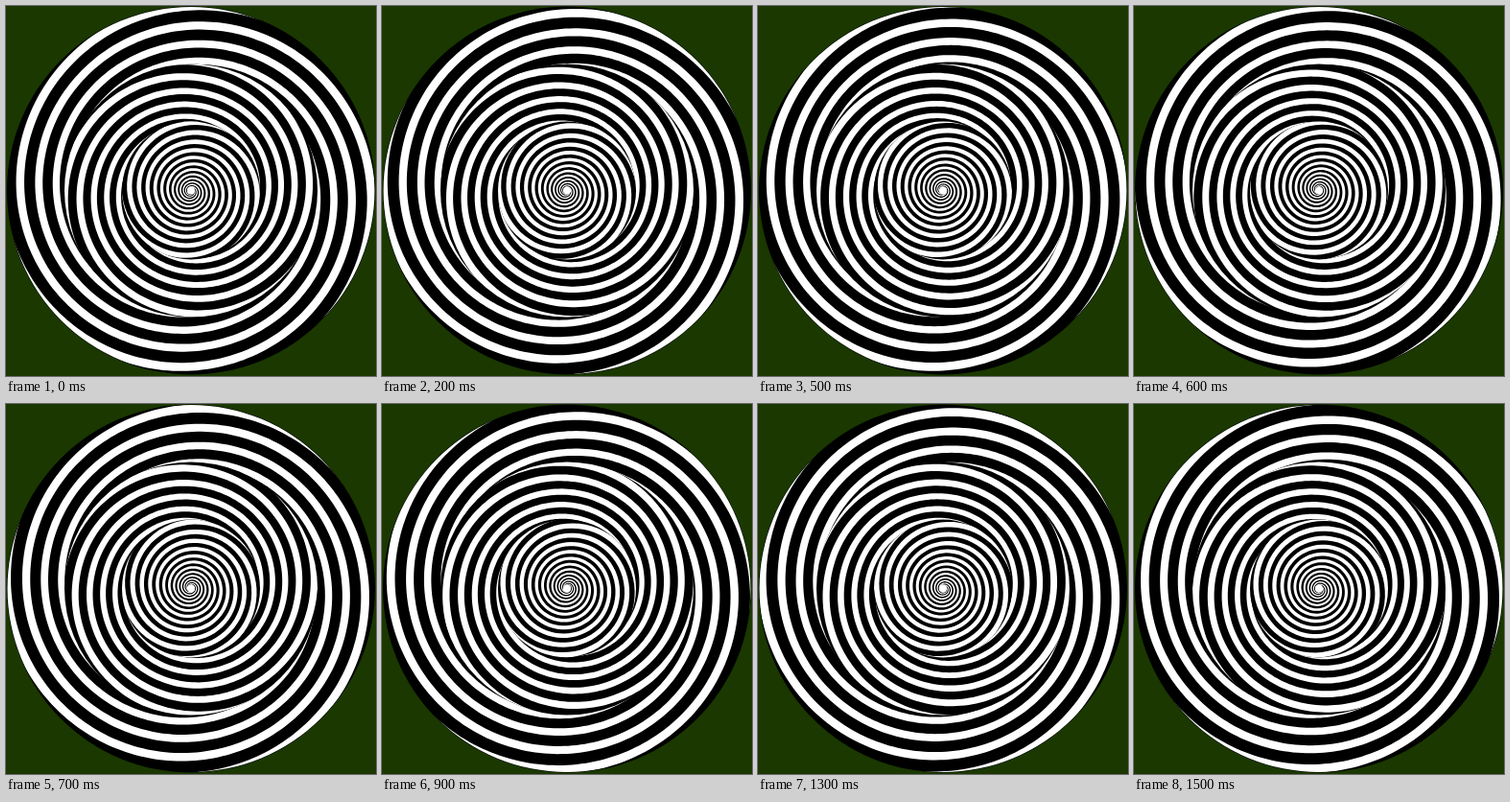
An HTML page with a canvas for the animation above (1600 ms loop, 386 by 386 pixels).

```html
<!DOCTYPE html>
<html lang="en">
<head>
<meta charset="utf-8">
<title>Spiral disc</title>
<style>
  html, body { margin: 0; height: 100%; overflow: hidden; background: #1a3800; }
  canvas { display: block; }
</style>
</head>
<body>
<canvas id="stage" width="386" height="386"></canvas>
<script>
const ctx = document.getElementById('stage').getContext('2d');
const CENTER = { x: 193, y: 192.5 };
const SPIRAL_SHIFT = { x: -0.2, y: 0.9 };
const LOOP = 1600, STEPS = 16;
const ARMS = 3, SECTOR = 2 * Math.PI / ARMS;

// Stripe spacing grows with the radius: u counts stripes from the centre.
const K = 3.78, Q = 0.36;
const stripesAt = r => K * r ** Q;
const radiusAt = u => (Math.max(u, 0) / K) ** (1 / Q);

// tip: angle in degrees at which the inner edge of a white arm meets radius tipAt.
const rings = [
  { from: 132, to: 191.5, dir: 1, tipAt: 191.5, tip: 75, white: 0.42 },
  { from: 72, to: 132, dir: -1, tipAt: 132, tip: 90, white: 0.45 },
  { from: 0, to: 72, dir: 1, tipAt: 72, tip: 60, white: 0.5 }
];

function disc(r, color) {
  ctx.beginPath();
  ctx.arc(0, 0, r, 0, 2 * Math.PI);
  ctx.fillStyle = color;
  ctx.fill();
}

function edge(ring, offset, reverse) {
  const lo = Math.max(stripesAt(ring.from) - 1, 0), hi = stripesAt(ring.to) + 1;
  const count = 400;
  for (let i = 0; i <= count; i++) {
    const f = i / count;
    const u = reverse ? hi + (lo - hi) * f : lo + (hi - lo) * f;
    const a = ring.dir * SECTOR * (offset - u), r = radiusAt(u);
    ctx.lineTo(r * Math.cos(a), -r * Math.sin(a));
  }
}

function drawRing(ring) {
  const start = stripesAt(ring.tipAt) + ring.dir * ring.tip / 360 * ARMS;
  ctx.save();
  ctx.beginPath();
  ctx.arc(0, 0, ring.to, 0, 2 * Math.PI);
  ctx.arc(0, 0, ring.from, 0, 2 * Math.PI, true);
  ctx.clip();
  ctx.translate(SPIRAL_SHIFT.x, SPIRAL_SHIFT.y);
  ctx.fillStyle = '#fff';
  for (let k = 0; k < ARMS; k++) {
    ctx.beginPath();
    edge(ring, start + k, false);
    edge(ring, start + k + ring.white, true);
    ctx.fill();
  }
  ctx.restore();
}

function draw(now) {
  const step = Math.floor(now % LOOP / LOOP * STEPS);
  ctx.fillStyle = '#1a3800';
  ctx.fillRect(0, 0, 386, 386);
  ctx.save();
  ctx.translate(CENTER.x, CENTER.y);
  ctx.rotate(step / STEPS * 2 * Math.PI);
  disc(192, '#000');
  rings.forEach(drawRing);
  disc(4, '#fff');
  ctx.restore();
}

const begin = performance.now();
function frame() {
  draw(performance.now() - begin);
  requestAnimationFrame(frame);
}
frame();
</script>
</body>
</html>
```
